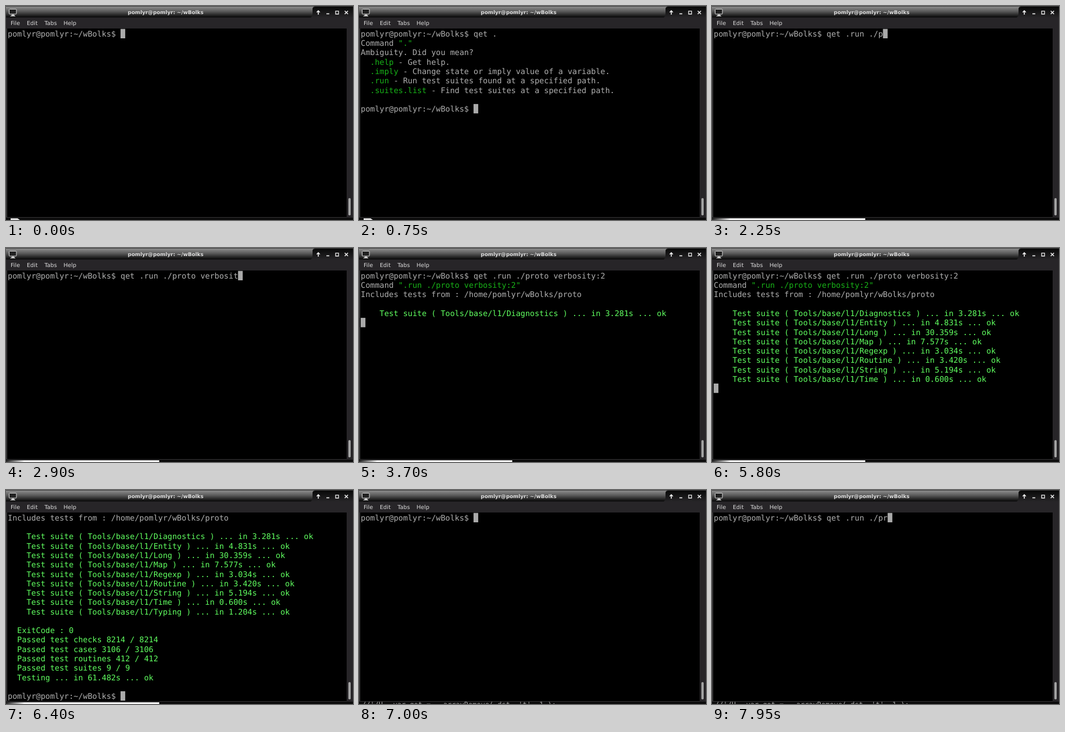
These frames come from a looping animation (600 px wide and 371 px high, 8000 ms). An HTML page:

```html
<!DOCTYPE html>
<html lang="en">
<head>
<meta charset="utf-8">
<title>Terminal</title>
<style>
  html, body { margin: 0; width: 100%; height: 100%; overflow: hidden; background: #000; }
  svg { display: block; width: 600px; height: 371px; }
  text { white-space: pre; text-rendering: geometricPrecision; }
  .title { font: bold 8.85px "DejaVu Sans", sans-serif; fill: #dcdcdc; text-anchor: middle; }
  .menu { font: 9.7px "DejaVu Sans", sans-serif; fill: #dcdcdc; }
  .code { font: 12px "DejaVu Sans Mono", monospace; fill: #aaa; }
  #rows { font: 13.5px "DejaVu Sans Mono", monospace; fill: #b0b0b0; }
  #rows .green { fill: #18b218; }
  #rows .bright { fill: #60ff60; }
</style>
</head>
<body>
<svg viewBox="0 0 600 371">
  <defs>
    <linearGradient id="bar" x2="0" y2="1">
      <stop offset="0" stop-color="#222"/>
      <stop offset=".08" stop-color="#8a8a8a"/>
      <stop offset=".45" stop-color="#5c5c5c"/>
      <stop offset=".9" stop-color="#141414"/>
      <stop offset="1" stop-color="#0c0c0c"/>
    </linearGradient>
    <linearGradient id="panel" x2="0" y2="1">
      <stop offset="0" stop-color="#080808"/>
      <stop offset="1" stop-color="#262527"/>
    </linearGradient>
    <linearGradient id="paper">
      <stop offset="0" stop-color="#222"/>
      <stop offset=".12" stop-color="#f4f4f4"/>
    </linearGradient>
  </defs>

  <!-- what shows below the window -->
  <rect y="366" width="600" height="5" fill="#0c0c0c"/>
  <g class="strip"><path d="M8 371V368H20L24 371Z" fill="#ddd"/></g>
  <g class="strip"><rect y="368" width="265" height="3" fill="url(#paper)"/></g>
  <g class="strip">
    <text class="code" x="5" y="375.5">//'/U,</text>
    <text class="code" x="59" y="375.5">var got = _.arrayRemove( dst, 't', 1 );</text>
  </g>

  <!-- window -->
  <rect width="600" height="367" fill="#272528"/>
  <rect width="600" height="20" fill="url(#bar)"/>
  <path d="M527 20Q530 18 530 12V5Q530 1 535 1H600V20Z" fill="url(#panel)"/>
  <rect x="1" y="39" width="588" height="327.5" fill="#444"/>
  <rect x="2" y="39" width="587" height="327" fill="#000"/>
  <rect x="592" y="333" width="4" height="30" rx="1.8" fill="#a2a2a2"/>

  <rect x="5.5" y="5.5" width="12.5" height="8.5" rx="1" fill="#222" stroke="#ddd"/>
  <path d="M10 14.5H14L15 17H9Z" fill="#ccc"/>
  <path d="M7.5 17.5H16" stroke="#ccc"/>

  <g stroke="#eee" stroke-width="1.6" fill="none">
    <path d="M540 15V9M537.3 11L540 8.2L542.7 11"/>
    <path d="M554 13.5H559"/>
    <path d="M570 8.8H575V14H570Z" stroke-width="1.3"/>
    <path d="M585.7 8.5L591.3 14M591.3 8.5L585.7 14"/>
  </g>

  <text class="title" x="276" y="14">pomlyr@pomlyr: ~/wBolks</text>
  <g class="menu">
    <text x="8" y="33">File</text>
    <text x="36" y="33">Edit</text>
    <text x="66.5" y="33">Tabs</text>
    <text x="99.5" y="33">Help</text>
  </g>

  <g id="rows"></g>
  <rect id="cursor" width="8.1" height="16.27" fill="#aaa"/>
</svg>
<script>
const LOOP = 8000, ROWS = 20, LEFT = 3, TOP = 39.75, BASELINE = 13.2, CELL_W = 8.127, CELL_H = 16.27;
const PROMPT = 'pomlyr@pomlyr:~/wBolks$ ';

// Screen states over time; |text| is green, a leading * makes a bright line.
const states = [{ at: 0, text: PROMPT }];
const show = (at, text) => states.push({ at, text });
const print = (at, text) => show(at, states[states.length - 1].text + text);
const type = (start, text) => [...text].forEach((char, i) => print(start + i * 50, char));

type(100, 'qet ');
print(300, '.\n');
print(450, [
  'Command |"."|',
  'Ambiguity. Did you mean?',
  '  |.help| - Get help.',
  '  |.imply| - Change state or imply value of a variable.',
  '  |.run| - Run test suites found at a specified path.',
  '  |.suites.list| - Find test suites at a specified path.',
  ''].join('\n'));
print(750, '\n' + PROMPT);

show(1500, PROMPT);
type(1700, 'qet .run ./proto verbosity:2\n');
print(3400, 'Command |".run ./proto verbosity:2"|\nIncludes tests from : /home/pomlyr/wBolks/proto\n\n');
const suites = [
  ['Diagnostics', '3.281'], ['Entity', '4.831'], ['Long', '30.359'],
  ['Map', '7.577'], ['Regexp', '3.034'], ['Routine', '3.420'],
  ['String', '5.194'], ['Time', '0.600'], ['Typing', '1.204']];
suites.forEach(([name, seconds], i) =>
  print(3700 + i * 300, `*    Test suite ( Tools/base/l1/${name} ) ... in ${seconds}s ... ok\n`));
print(6400, [
  '',
  '*  ExitCode : 0',
  '*  Passed test checks 8214 / 8214',
  '*  Passed test cases 3106 / 3106',
  '*  Passed test routines 412 / 412',
  '*  Passed test suites 9 / 9',
  '*  Testing ... in 61.482s ... ok',
  '',
  PROMPT].join('\n'));

show(7000, PROMPT);
type(7300, 'qet .r');
type(7650, 'un ./pr');

const svgNode = (tag, parent, attrs) => {
  const node = document.createElementNS('http://www.w3.org/2000/svg', tag);
  for (const key in attrs) node.setAttribute(key, attrs[key]);
  return parent.appendChild(node);
};
const rows = Array.from({ length: ROWS }, (_, i) =>
  svgNode('text', document.getElementById('rows'), { x: LEFT, y: TOP + BASELINE + i * CELL_H }));
const cursor = document.getElementById('cursor');
const strips = document.querySelectorAll('.strip');

function drawRow(row, line) {
  row.textContent = '';
  const bright = line.startsWith('*');
  line.replace(/^\*/, '').split('|').forEach((part, i) => {
    svgNode('tspan', row, { class: bright ? 'bright' : i % 2 ? 'green' : '' }).textContent = part;
  });
}

function draw(state) {
  const lines = state.text.split('\n').slice(-ROWS);
  rows.forEach((row, i) => drawRow(row, lines[i] || ''));
  const last = lines.length - 1;
  cursor.setAttribute('x', LEFT + lines[last].length * CELL_W);
  cursor.setAttribute('y', TOP + last * CELL_H);
  const strip = state.at < 1500 ? 0 : state.at < 7000 ? 1 : 2;
  strips.forEach((node, i) => { node.style.display = i === strip ? '' : 'none'; });
}

const start = performance.now();
let shown;
function tick() {
  const time = (performance.now() - start) % LOOP;
  const state = states.filter(s => s.at <= time).pop();
  if (state !== shown) draw(shown = state);
  requestAnimationFrame(tick);
}
tick();
</script>
</body>
</html>
```
